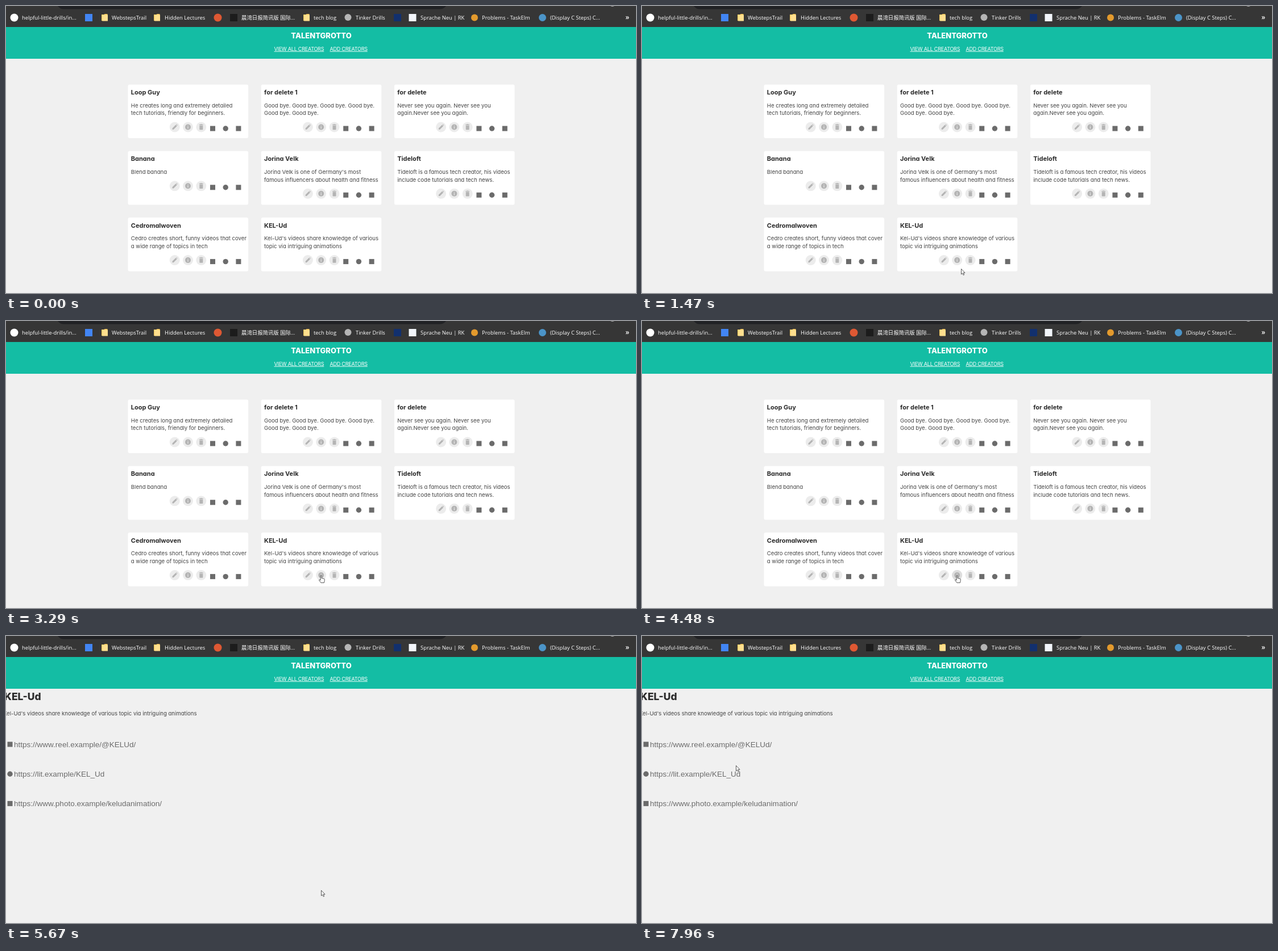
Write an HTML page that moves like this. It is 1108x506 px and loops after 8 s.

```html
<!DOCTYPE html>
<html lang="en">
<head>
<meta charset="utf-8">
<title>Creator list</title>
<style>
  html, body { margin: 0; width: 100%; height: 100%; overflow: hidden; background: #f0f0f0; }
  svg { display: block; width: 100%; height: 100%; }
  text { font-family: Inter, "Open Sans", sans-serif; font-feature-settings: "cv11"; white-space: pre; }
  .tab { font: 9.4px "Open Sans", "Noto Sans CJK SC", "Noto Sans CJK", sans-serif; fill: #fff; }
  .brand { font-size: 13px; font-weight: 800; fill: #fff; text-anchor: middle; }
  .nav { font-size: 9px; letter-spacing: -.025em; fill: #fff; text-decoration: underline; }
  .name { font-size: 11px; font-weight: 700; fill: #2b2b2b; }
  .body { font-size: 9.6px; fill: #444; }
  .big { font-size: 17.5px; font-weight: 800; fill: #2b2b2b; }
  .link { font: 13.52px "Liberation Sans", Arial, sans-serif; fill: #6c6c6c; }
</style>
</head>
<body>
<svg id="stage" viewBox="0 0 1108 506"></svg>
<script>
const LOOP = 8000;
const GREY = '#6b6b6b';

const rect = (x, y, w, h, fill, r = 0) =>
  `<rect x="${x}" y="${y}" width="${w}" height="${h}" rx="${r}" fill="${fill}"/>`;
const disc = (x, y, r, fill) => `<circle cx="${x}" cy="${y}" r="${r}" fill="${fill}"/>`;
const text = (x, y, cls, str) => `<text x="${x}" y="${y}" class="${cls}">${str}</text>`;
const group = (x, y, inner) => `<g transform="translate(${x} ${y})">${inner}</g>`;
const path = (d, fill, more = '') => `<path d="${d}" fill="${fill}" ${more}/>`;

// Bookmark bar
const square = (x, fill) => rect(x, 14, 13, 13, fill);
const folder = x => group(x, 14, path('M0 1H4.5L5.5 0H10.5V12H0Z', '#f3c75c') + rect(1.2, 1.6, 9.8, 11, '#ffdf8e', .6));

function toolbar() {
  const labels = [
    [28, 'helpful-little-drills/in...'], [186, 'WebstepsTrail'], [279, 'Hidden Lectures'],
    [414, '晨湾日报简讯版 国际...'], [541, 'tech blog'], [615, 'Tinker Drills'],
    [729, 'Sprache Neu | RK'], [837, 'Problems - TaskElm'], [957, '(Display C Steps) C...']
  ];
  return rect(0, 0, 1108, 37, '#363636') +
    path('M91 0Q95 5.5 102 5.5H762Q770 5.5 774 0Z', '#202124') +
    path('M1063 0Q1066.5 1.5 1070 0Z', '#ddd') +
    disc(14.5, 20.5, 7, '#fff') + square(139, '#4285f4') + disc(372.5, 20.5, 7, '#de5833') +
    square(394, '#1c1c1c') + disc(601.5, 20, 6, '#b5b5b5') + square(682, '#12306e') +
    square(708.5, '#f2f5fa') + disc(824, 20.5, 6, '#e39a2d') + disc(943.5, 20.5, 6.5, '#4b94c8') +
    [168, 260, 523].map(folder).join('') +
    labels.map(([x, s]) => text(x, 24.3, 'tab', s)).join('') +
    `<text x="1089.5" y="24.3" class="tab" style="font-size:12px;font-weight:600">»</text>`;
}

const header = () => rect(0, 37, 1108, 56, '#14bda4') +
  text(554.5, 57.4, 'brand', 'TALENTGROTTO') +
  text(471.5, 78.7, 'nav', 'VIEW ALL CREATORS') + text(569.5, 78.7, 'nav', 'ADD CREATORS');

// Cards
const INK = '#b4b4b4';
const pencil = path('M-4.2 4.2V2L1.8 -4L4 -1.8L-2 4.2ZM2.5 -4.6L3.2 -5.2L5.2 -3.2L4.6 -2.5Z', INK);
const info = disc(0, 0, 5, INK) + rect(-.6, -.7, 1.2, 3.4, '#ececec') + rect(-.6, -2.7, 1.2, 1.2, '#ececec');
const trash = rect(-3.4, -4.7, 6.8, 1.3, INK) + rect(-1.2, -5.3, 2.4, 1, INK) + rect(-3, -2.7, 6, 7.4, INK, .8);
const button = (x, y, icon) => group(x, y, disc(0, 0, 9, '#ececec') + icon);

const box = size => (x, y) => rect(x - size / 2, y - size / 2, size, size, GREY);
const social = [box(9), (x, y) => disc(x, y, 4.7, GREY), box(9)];

const cards = [
  ['Loop Guy', 'He creates long and extremely detailed', 'tech tutorials, friendly for beginners.'],
  ['for delete 1', 'Good bye. Good bye. Good bye. Good bye.', 'Good bye. Good bye.'],
  ['for delete', 'Never see you again. Never see you', 'again.Never see you again.'],
  ['Banana', 'Blend banana'],
  ['Jorina Velk', "Jorina Velk is one of Germany's most", 'famous influencers about health and fitness'],
  ['Tideloft', 'Tideloft is a famous tech creator, his videos', 'include code tutorials and tech news.'],
  ['Cedromalwoven', 'Cedro creates short, funny videos that cover', 'a wide range of topics in tech'],
  ['KEL-Ud', "Kel-Ud's videos share knowledge of various", 'topic via intriguing animations']
];

function card([name, ...lines], i) {
  const y = 48 + 13.5 * lines.length;
  return group(214.5 + i % 3 * 234.2, 138.5 + Math.floor(i / 3) * 117.3,
    rect(0, 0, 211.6, 94.6, '#fff', 3) + text(5.3, 17.6, 'name', name) +
    lines.map((s, n) => text(5.3, 40.3 + n * 13.5, 'body', s)).join('') +
    [pencil, info, trash].map((icon, n) => button(82.2 + n * 23.3, y, icon)).join('') +
    social.map((draw, n) => draw(149 + n * 22.7, y + 2.5)).join(''));
}

// Detail page
const loading = social.map((draw, n) => draw(7, 133.5 + n * 36.3)).join('');
const links = [
  'https://www.reel.example/@KELUd/',
  'https://lit.example/KEL_Ud',
  'https://www.photo.example/keludanimation/'
];
const detail = text(-3, 113, 'big', 'KEL-Ud') +
  text(-5, 139.6, 'body', "Kel-Ud's videos share knowledge of various topic via intriguing animations") +
  links.map((s, n) => social[n](7, 191 + n * 52.2) + text(14, 195.6 + n * 52.2, 'link', s)).join('');

const outline = 'stroke="#333" stroke-width=".8"';
const arrow = path('M.5 .5V10L2.6 8L4.2 11.5L5.7 10.8L4.2 7.4H7Z', '#fff', outline);
const hand = path('M-.8 1Q.2 0 1.1 1V5.5L5 6.3Q6.7 6.8 6.4 8.6L5.4 13.5H-.2L-3.5 8.8Q-3.2 7.4 -1.7 8.3L-.8 9.2Z', '#fff', outline);

const layer = (id, inner) => `<g id="${id}">${inner}</g>`;
document.getElementById('stage').innerHTML = rect(0, 0, 1108, 506, '#f0f0f0') + toolbar() + header() +
  layer('list', cards.map(card).join('') + layer('press', button(554.2, 448.1, disc(0, 0, 9, '#dedede') + info))) +
  layer('loading', loading) + layer('detail', detail) +
  layer('cursor', layer('arrow', arrow) + layer('hand', hand));

const el = {};
for (const id of ['list', 'press', 'loading', 'detail', 'cursor', 'arrow', 'hand']) el[id] = document.getElementById(id);
const show = (id, on) => el[id].setAttribute('display', on ? 'inline' : 'none');

// Pointer moves: first step, last step, step count, path
const moves = [
  [390, 590, 4, [[1030, 456], [969, 462], [870, 472], [786, 481]]],
  [930, 1470, 9, [[786, 481], [690, 494], [590, 483], [561, 463]]],
  [1610, 1880, 5, [[561, 463], [558, 457], [555, 450]]],
  [3090, 3090, 1, [[555, 450], [555, 448]]],
  [3290, 3290, 1, [[555, 448], [554, 448]]],
  [7210, 7210, 1, [[554, 448], [545, 410]]],
  [7278, 7960, 11, [[545, 410], [355, 245], [165, 147], [35, 154], [5, 196], [75, 225], [165, 228]]]
];

function along(pts, u) {
  const s = u * (pts.length - 1), i = Math.min(Math.floor(s), pts.length - 2), f = s - i;
  const at = n => pts[Math.max(0, Math.min(pts.length - 1, n))];
  const [a, b, c, d] = [at(i - 1), at(i), at(i + 1), at(i + 2)];
  return [0, 1].map(k => b[k] + f / 2 * (c[k] - a[k] +
    f * (2 * a[k] - 5 * b[k] + 4 * c[k] - d[k] + f * (3 * (b[k] - c[k]) + d[k] - a[k]))));
}

function pointer(t) {
  const move = moves.filter(m => t >= m[0]).pop();
  if (!move) return null;
  const [from, to, count, pts] = move;
  const step = count > 1 ? Math.floor((t - from) / (to - from) * (count - 1) + 1e-6) : 0;
  return along(pts, Math.min(1, (step + 1) / count));
}

function render(t) {
  show('list', t < 4680);
  show('press', t >= 4480 && t < 4680);
  show('loading', t >= 4680 && t < 5670);
  show('detail', t >= 5670);
  const p = pointer(t);
  show('cursor', p);
  if (!p) return;
  const over = t < 4680 && Math.hypot(p[0] - 554.2, p[1] - 448.1) < 9;
  show('hand', over);
  show('arrow', !over);
  el.cursor.setAttribute('transform', `translate(${p[0].toFixed(1)} ${p[1].toFixed(1)})`);
}

const start = performance.now();
function tick() {
  render((performance.now() - start) % LOOP);
  requestAnimationFrame(tick);
}
tick();
</script>
</body>
</html>
```
